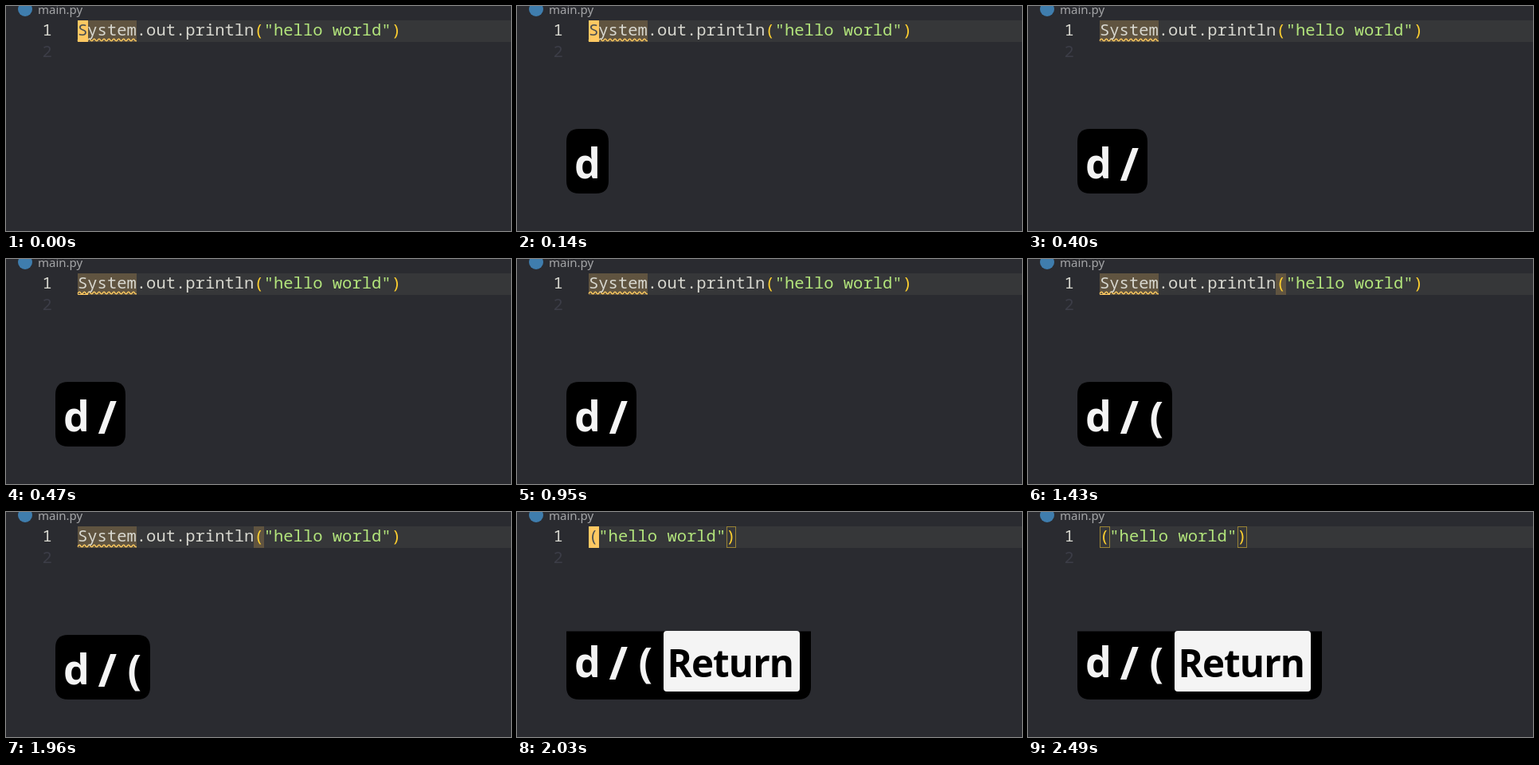
An HTML page for the animation above (2.62 s loop, 634 by 282 pixels).

```html
<!DOCTYPE html>
<html lang="en">
<head>
<meta charset="utf-8">
<title>Editor keystrokes</title>
<style>
html, body { margin: 0; width: 100%; height: 100%; overflow: hidden; background: #2a2b30; }
svg { display: block; }
text { white-space: pre; }
.code { font: 500 20.5px "Noto Sans Mono", "DejaVu Sans Mono", monospace; fill: #d8d8d0; }
.str { fill: #b3e57c; }
.par { fill: #ffd02f; }
.keys { font: 700 52px "Noto Sans", "Open Sans", sans-serif; fill: #f4f4f4; }
.slash { font-weight: 600; font-size: 57px; }
.enter { font: 600 47.5px "Noto Sans", "Open Sans", sans-serif; letter-spacing: -0.9px; }
.mark { fill: #605440; }
.frame { fill: none; stroke: #9a8435; }
</style>
</head>
<body>
<svg width="634" height="282" viewBox="0 0 634 282">
  <rect width="634" height="282" fill="#2a2b30"/>
  <circle cx="24" cy="4" r="9" fill="#3f7dad"/>
  <text x="40" y="10" font-family="'Noto Sans', sans-serif" font-size="15" fill="#a5a6a8">main.py</text>
  <rect x="90" y="18" width="544" height="27" fill="#363739"/>
  <text class="code" x="45.5" y="37">1</text>
  <text class="code" x="45.5" y="64" style="fill:#3c3d47">2</text>

  <g id="before">
    <rect class="mark" x="90" y="18" width="74" height="27"/>
    <rect id="hit" class="mark" x="311" y="18" width="13" height="27"/>
    <path id="wave" fill="none" stroke="#fcc95f" stroke-width="1.4"/>
    <text class="code" x="90" y="37">System.out.println<tspan class="par">(</tspan><tspan class="str">"hello world"</tspan><tspan class="par">)</tspan></text>
  </g>
  <g id="after">
    <text class="code" x="90" y="37"><tspan class="par">(</tspan><tspan class="str">"hello world"</tspan><tspan class="par">)</tspan></text>
    <rect id="open" class="frame" x="90.5" y="18.5" width="12" height="26"/>
    <rect class="frame" x="263.5" y="18.5" width="11" height="26"/>
  </g>
  <g id="block">
    <rect x="90" y="18" width="13" height="27" fill="#ffc862"/>
    <text id="under" class="code" x="90" y="37" style="fill:#4b4f52"></text>
  </g>
  <rect id="line" x="90" y="44" width="13" height="1" fill="#ffc862"/>

  <g id="panel">
    <path id="box"/>
    <g id="typed" class="keys">
      <text x="72" y="216">d</text>
      <text class="slash" x="115.5" y="219">/</text>
      <text x="152.5" y="216">(</text>
    </g>
    <g id="enter">
      <rect x="184" y="149" width="171" height="76" rx="4" fill="#f4f4f4"/>
      <text class="enter" x="188.5" y="207">Return</text>
    </g>
  </g>
</svg>
<script>
const LOOP = 2620;
const WIDTHS = [0, 53, 88, 119, 307];
const STEPS = [140, 400, 1230, 2030];
const $ = id => document.getElementById(id);
const show = (id, on) => $(id).setAttribute("visibility", on ? "inherit" : "hidden");
const within = (t, a, b) => t >= a && t < b;

// Panel outline; the top corners are square once the tall key is in.
function outline(w, tall) {
  const top = tall ? 149.4 : 154, r = 16, q = tall ? 0 : r;
  return `M62 ${top + q}q0 ${-q} ${q} ${-q}H${62 + w - q}q${q} 0 ${q} ${q}` +
    `V${235 - r}q0 ${r} ${-r} ${r}H${62 + r}q${-r} 0 ${-r} ${-r}Z`;
}

function draw(t) {
  const count = STEPS.filter(s => t >= s).length;
  const done = count === 4;
  show("before", !done);
  show("after", done);
  show("hit", count === 3);
  show("open", t >= 2490);
  show("block", t < 400 || within(t, 2030, 2490));
  show("line", within(t, 470, 950) || within(t, 1430, 1960));
  $("under").textContent = done ? "(" : "S";

  show("panel", count > 0);
  show("enter", done);
  $("box").setAttribute("d", outline(WIDTHS[count], done));
  $("typed").setAttribute("transform", `translate(0 ${done ? -9 : 0})`);
  [...$("typed").children].forEach((key, i) =>
    key.setAttribute("visibility", i < count ? "inherit" : "hidden"));
}

// Warning underline: one crest and trough per character.
let wave = "M90 43.5";
for (let i = 0; i < 24; i++) wave += `q1.54 ${i % 2 ? 3 : -3} 3.08 ${i % 2 ? 2 : -2}`;
$("wave").setAttribute("d", wave);

const start = performance.now();
function tick(now) {
  draw(Math.max(0, now - start) % LOOP);
  requestAnimationFrame(tick);
}
draw(0);
requestAnimationFrame(tick);
</script>
</body>
</html>
```
